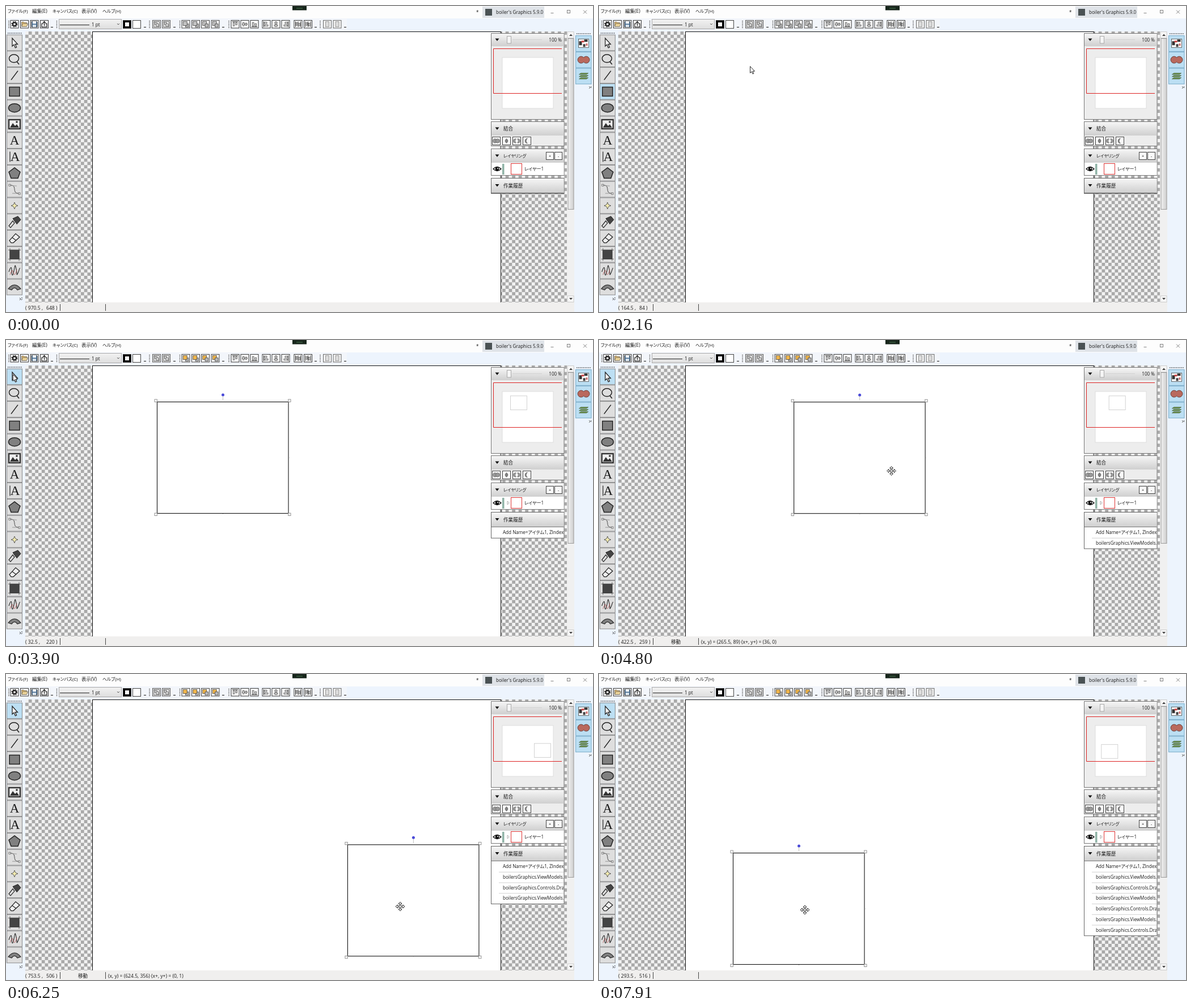
These frames come from a looping animation (1035 px wide and 541 px high, 8000 ms). An HTML page:

```html
<!DOCTYPE html>
<html lang="ja">
<head>
<meta charset="utf-8">
<title>Drawing and moving a rectangle</title>
<style>
html, body { margin: 0; width: 100%; height: 100%; overflow: hidden; background: #fff; }
svg { display: block; width: 100%; height: 100%; }
text { font-family: "Open Sans", "Noto Sans CJK JP", "Noto Sans CJK", sans-serif; fill: #1a1a1a; white-space: pre; }
.kana { font-feature-settings: "palt" 1; }
.serif { font-family: "Liberation Serif", serif; }
</style>
</head>
<body>
<svg id="stage" viewBox="0 0 1035 541" preserveAspectRatio="none"></svg>
<script>
const LOOP = 8000, STEP = 69.5, LAG = 70, ZOOM = 0.72;
const PAGE = { x: 152, y: 45 };
const INK = '#222', GRAY = '#808080';

// ---- drawing helpers ----
const rect = (x, y, w, h, fill = 'none', stroke = 'none', sw = 1) =>
  `<rect x="${x}" y="${y}" width="${w}" height="${h}" fill="${fill}" stroke="${stroke}" stroke-width="${sw}"/>`;
const path = (d, fill = 'none', stroke = 'none', sw = 1) =>
  `<path d="${d}" fill="${fill}" stroke="${stroke}" stroke-width="${sw}"/>`;
const oval = (x, y, rx, ry, fill = 'none', stroke = 'none', sw = 1) =>
  `<ellipse cx="${x}" cy="${y}" rx="${rx}" ry="${ry}" fill="${fill}" stroke="${stroke}" stroke-width="${sw}"/>`;
const text = (x, y, s, size = 8.1, cls = '', more = '') =>
  `<text x="${x}" y="${y}" font-size="${size}" class="${cls}" ${more}>${s}</text>`;
const at = (x, y, body) => `<g transform="translate(${x} ${y})">${body}</g>`;
const dots = (x1, y1, x2, y2) =>
  `<path d="M${x1} ${y1}L${x2} ${y2}" stroke="#444" stroke-width="1.4" stroke-dasharray="1.4 1.5"/>`;

// ---- left tool bar ----
const toolIcons = [
  path('M-4-8V6L-1 3.3 1.4 9 3.6 8 1.2 2.5H5.5Z', '#fff', INK, 1.3),
  oval(-1, -1, 8.5, 7, 'none', INK, 1.5) + path('M4 4.5L8 9.5', 'none', INK, 1.6),
  path('M-6 8L6-8', 'none', INK, 1.5),
  rect(-9, -8, 18, 16, GRAY, INK, 1.5),
  oval(0, 0, 10.5, 7.5, GRAY, INK, 1.5),
  rect(-10, -8, 20, 16, '#eee', '#333', 2.4) + path('M-8 6L-3-2 1 3 4 0 8 6Z', '#333') + oval(4, -4, 1.8, 1.8, '#333'),
  text(0, 7.5, 'A', 23, 'serif', 'text-anchor="middle"'),
  text(1, 7.5, 'A', 23, 'serif', 'text-anchor="middle"') + path('M-8-9V9', 'none', INK, 1.2),
  path('M0-9.5L10-2 6 9H-6L-10-2Z', GRAY, INK, 1.5),
  path('M-8-7C6-9-6 8 8 7', 'none', '#444') + path('M-8-7L4-6M-4 7L8 7', 'none', '#888', .8) +
    rect(-10, -9, 3, 3, '#fff', '#555', .8) + rect(7, 6, 3, 3, '#fff', '#555', .8),
  path('M0-6L1.7-1.7 6 0 1.7 1.7 0 6-1.7 1.7-6 0-1.7-1.7Z', '#f6eeb0', '#555', .9),
  path('M-3-6L6-10 11-4 4 4Z', '#444', INK, 1) + path('M-4-5L3 4', 'none', '#eee', 1) +
    path('M-3-2L0 2-7 10-10 7Z', '#ddd', INK, 1.2),
  path('M-9 4L2-8 9-2-2 8H-6Z', '#eee', INK, 1.3) + path('M-4-1L3 4', 'none', INK, 1.2),
  rect(-8, -8, 16, 16, '#444', '#111', 1) + path('M-11-8H11M-11 8H11M-8-11V11M8-11V11', 'none', '#555', .9),
  path('M-10 2C-7-8-5-8-5 0S-3 12-1 0 1-12 3-3 3 10 6 4 8-5 10-5', 'none', '#222', 1.1) +
    path('M-8 7C-5 0-4-4-2 3S2 6 4-2', 'none', '#a44', .8),
  path('M-11 3Q0-11 11 3L5 5Q0-2-5 5Z', GRAY, INK, 1.1)
];
const TOOL_PITCH = 28.8;
const toolBar = rect(0, 45, 34, 496, '#edf4fd') + dots(3, 48, 28, 48) +
  toolIcons.map((icon, i) => {
    const y = 51 + TOOL_PITCH * i;
    return `<rect class="tool" x="1.5" y="${y}" width="27" height="27.8" stroke="#8a8a8a"/>` + at(15, y + 14, icon);
  }).join('') +
  path('M24 516l2 2-2 2M27 516h2M27 520l1.5-2', 'none', INK, .9);

// ---- top bars ----
const box = (cx, body, fill = '#fff', stroke = '#333') =>
  at(cx, 32.2, rect(-7, -6.8, 14, 13.6, fill, stroke, 1) + body);
const overflow = x => path(`M${x - 2} 37.5h4`, 'none', '#333', 1.2);
const align = (cx, turn, edge) => box(cx, `<g transform="rotate(${turn})">` +
  path(`M-5 ${edge * .9}H5`, 'none', INK, 1) +
  rect(-3.6, -3, 2.6, 6, '#eee', '#444', .8) + rect(1, edge < 0 ? -3 : edge > 0 ? -1 : -2, 2.6, 4, '#eee', '#444', .8) + '</g>');
const grouping = cx => box(cx, rect(-4.8, -4.8, 9.6, 9.6, 'none', '#555', .9) +
  path('M-4.5-4.5L4.5 4.5', 'none', '#777', .8) +
  rect(-3, -3, 4, 4, '#ddd', '#555', .8) + rect(-.5, -.5, 4, 4, '#eee', '#555', .8), '#f4f4f4', '#555');
const arrange = (cx, i) => box(cx, i < 2
  ? rect(-.5, -.5, 5.5, 5.5, '#bbb', '#444', .8) + rect(-4.8, -4.8, 7, 7, 'currentColor', '#444', .8)
  : rect(-4.8, -4.8, 7, 7, 'currentColor', '#444', .8) + rect(-.5, -.5, 5.5, 5.5, '#bbb', '#444', .8), '#f8f8f8', '#444');
const spread = cx => box(cx, path('M-4.5-5V5M0-5V5M4.5-5V5', 'none', INK, .9) +
  rect(-3.5, -3, 2.4, 5, '#ccc', '#444', .6) + rect(1, -2, 2.6, 5, '#ccc', '#444', .6));

const topBars = rect(0, 0, 1035, 22, '#fdfdfd') + rect(0, 22, 1035, 23, '#edf4fd') +
  rect(3, 22.5, 598, 19.5, '#f3f6fb') +
  text(3, 12, 'ファイル(F)', 7.8, 'kana') + text(46, 12, '編集(E)', 8.5) + text(82, 12, 'キャンバス(C)', 7.8, 'kana') +
  text(133, 12, '表示(V)', 8.5) + text(170, 12, 'ヘルプ(H)', 7.8, 'kana') +
  rect(505, 0, 25, 7.5, '#17251b') + path('M512 4h11', 'none', '#4d7a55', 1) +
  text(829, 14, '*') + rect(840, 1, 109, 20, '#dfe3e8') + rect(845, 5, 12, 12, '#4a5254') +
  text(864, 14, "boiler's Graphics 5.9.0") +
  path('M960.5 12.5h5M1018 7.5l6 6M1024 7.5l-6 6', 'none', '#777', .9) + rect(989.5, 7.5, 5, 5, 'none', '#777', .9) +
  [5, 89.5, 253, 306.5, 393, 554].map(x => dots(x, 26, x, 40)).join('') +
  [81, 245, 297, 383, 546, 598].map(overflow).join('') +
  box(15, oval(0, 0, 3, 3, 'none', INK, 2.2) + `<circle r="4.8" fill="none" stroke="${INK}" stroke-width="1.6" stroke-dasharray="1.9 1.87"/>`) +
  box(32.5, path('M-5 4V-4H-1L0-3H4V4Z', '#d9b36a', '#555', .7) + path('M-5 4L-3-1H6L4 4Z', '#f0d79a', '#555', .7)) +
  box(50, path('M-5-5H4L5-4V5H-5Z', '#55799c', INK, .8) + rect(-3, -5, 6, 4, '#fff') + rect(-3, 1, 6, 4, '#dde6ee')) +
  box(67.5, path('M-2-1H-4.5V5H4.5V-1H2M0 3V-4.5M-2.5-2L0-5 2.5-2', 'none', INK, 1.3)) +
  rect(93.5, 23.5, 110, 17, 'url(#combo)', '#aaa') + path('M95 33.5H147', 'none', INK, 1) + text(151, 36, '1 pt') +
  path('M196 31l2 2 2-2', 'none', '#444', .9) +
  rect(206.5, 25.5, 14, 14, '#000', '#333') + rect(210, 29, 7, 7, '#fff') + rect(223.5, 25.5, 14, 14, '#fff', '#444') +
  [265.5, 282.5].map(grouping).join('') +
  `<g id="arrange">${[317, 334.5, 351.5, 369].map(arrange).join('')}</g>` +
  align(404, 0, -5) + align(421, 0, 0) + align(438, 0, 5) + align(459, -90, -5) + align(476, -90, 0) + align(493, -90, 5) +
  spread(515) + spread(532.5) +
  [566.5, 584].map(x => box(x, rect(-3, -4.5, 6, 9, '#ddd', '#888', .8), '#f4f4f4', '#666')).join('');

// ---- right side ----
const panel = (y, h) => rect(855.5, y + .5, 128.5, h - 1, '#ededed', '#777');
const header = (y, h, label, cls, size) => rect(856, y + 1, 127.5, h, 'url(#head)') +
  path(`M862.5 ${y + h / 2 - 1.5}h7l-3.5 4.5z`, '#111') + (label ? text(877, y + h / 2 + 4, label, size, cls) : '');
const button = (x, y, s, body) => rect(x + .5, y + .5, s, s, '#fafafa', '#444') + at(x + s / 2 + .5, y + s / 2 + .5, body);
const two = oval(-2.3, 0, 3.5, 3.8, '#999', '#666', .7) + oval(2.3, 0, 3.5, 3.8, '#999', '#666', .7);

const panels = panel(48, 153) + header(48, 22) + path('M893 59.5H945', 'none', '#d2d2d2', 1) +
  rect(883.5, 53.5, 7, 12.5, '#f4f4f4', '#aaa') + text(980, 62.5, '100 %', 8.1, '', 'text-anchor="end"') +
  rect(875, 91, 90, 90, '#fff', '#ddd') +
  path('M980 75.5H859.5V154.5H980', 'none', '#d22', 1) +
  panel(204, 44) + header(204, 24, '結合', '', 8.6) +
  button(857, 231, 14, two) + button(875, 231, 14, path('M0-4Q5 0 0 4Q-5 0 0-4', GRAY, '#666', .6)) +
  button(893, 231, 14, two + path('M0-4Q4 0 0 4Q-4 0 0-4', '#fff')) +
  button(911, 231, 14, path('M1-4.5A4.5 4.5 0 1 0 1 4.5Q-3.5 0 1-4.5', GRAY, '#666', .6)) +
  panel(252, 48) + header(252, 24, 'レイヤリング', 'kana', 7.6) +
  button(952, 258, 13, text(0, 3, '+', 8, '', 'text-anchor="middle"')) +
  button(967, 258, 13, text(0, 3, '-', 8, '', 'text-anchor="middle"')) +
  rect(856, 277, 127.5, 22, '#fff') +
  path('M859 288Q866 281 873 288Q866 295 859 288Z', '#fff', '#111', 1.3) + oval(866, 288, 3.4, 3.4, '#111') + oval(867, 287, 1, 1, '#fff') +
  rect(875, 279, 3.5, 19, '#8fb3a6') + rect(890.5, 278.5, 19, 19, '#fff', '#d33') + text(914, 291, 'レイヤー1', 8.1, 'kana');

const sideButton = (y, body) => rect(1004.5, y + .5, 27.5, 27.8, '#bcdff3', '#76a9c6') + at(1018.5, y + 14.3, body);
const rightSide = rect(989, 45, 13, 479, '#f0f0f0') + rect(990, 45.5, 11, 11, '#f7f7f7', '#ccc') +
  rect(991, 57.5, 10, 302, 'url(#thumb)', '#999') + rect(990, 512.5, 11, 11, '#f7f7f7', '#ccc') +
  path('M993 53l3-3.5 3 3.5zM993 516l3 3.5 3-3.5z', '#444') +
  rect(1002, 45, 33, 496, '#edf4fd') + dots(1006, 49, 1031, 49) +
  sideButton(52, rect(-9, -8, 18, 15, '#fff', '#444', .8) + rect(-8, -4, 5, 7, '#333') + rect(1, -7, 6, 4, '#333') +
    rect(-1, 1, 4, 5, '#444') + rect(-4, -5, 5, 3, '#c44') + rect(4, 0, 3, 4, '#c66')) +
  sideButton(80.8, path('M0-4A6 6 0 1 0 0 4A6 6 0 1 0 0-4Z', '#b9695d', '#6b3d38', 1)) +
  sideButton(109.6, [4, 0, -4].map(y => path(`M-8 ${y + 1.1}L-5 ${y - 1.1}H8L5 ${y + 1.1}Z`, '#6f9a4f', '#475e35', .8)).join('')) +
  path('M1028 142l2 2-2 2M1031.5 142v3', 'none', '#444', .9);

const statusBar = rect(34, 524, 968, 17, '#f0efee') + path('M95.5 527V539M175.5 527V539', 'none', '#444', 1);

document.getElementById('stage').innerHTML = `<defs>
  <pattern id="check" x="34" y="45" width="11.52" height="11.52" patternUnits="userSpaceOnUse">
    <rect width="11.52" height="11.52" fill="#a9a9a9"/><path d="M0 0h5.76v11.52h5.76v-5.76H0z" fill="#f2f2f2"/></pattern>
  <linearGradient id="head" x2="0" y2="1"><stop stop-color="#f6f6f6"/><stop offset="1" stop-color="#cfcfcf"/></linearGradient>
  <linearGradient id="combo" x2="0" y2="1"><stop stop-color="#f2f2f2"/><stop offset="1" stop-color="#dedede"/></linearGradient>
  <linearGradient id="thumb"><stop stop-color="#f0f0f0"/><stop offset="1" stop-color="#cfcfcf"/></linearGradient>
  <clipPath id="list"><rect x="856" y="300" width="127" height="230"/></clipPath></defs>` +
  rect(0, 0, 1035, 541, '#fff') + rect(34, 45, 955, 479, 'url(#check)') + rect(152.5, 45.5, 720, 490, '#fff', '#111') +
  '<g id="shape"></g>' + topBars + toolBar + rightSide + statusBar + panels + '<g id="live"></g>';

// ---- motion ----
// Pointer path: time, x, y
const keys = [
  [220, 580, 530], [430, 9, 255], [830, 9, 255], [1150, 15, 150], [1400, 15, 150], [1600, 25, 146],
  [2090, 270.6, 105.5], [2160, 266, 107], [2210, 266, 109], [2440, 470, 285], [2780, 505.7, 317.7],
  [2850, 502, 312], [2960, 498, 306], [3120, 498, 306], [3260, 486, 300], [3520, 175.7, 203.5], [3700, 12, 61],
  [4000, 12, 61], [4100, 40, 75], [4420, 379, 231], [4550, 379, 231], [5100, 713, 232], [5350, 713, 232],
  [5420, 707, 230], [5570, 692.6, 218], [5700, 692.6, 218], [6130, 694.4, 408.3], [6180, 694.5, 409.3],
  [6250, 695, 411], [6320, 695, 412], [6520, 695, 412], [6640, 721, 405], [6760, 721, 405],
  [7230, 354.6, 417], [7700, 354.6, 417], [7840, 363.3, 416.5], [7910, 363, 417]
];
const drags = [[4500, 5280], [5650, 6560], [6720, 7440]];
const DRAW = [2200, 3130], PICK_RECT = 1200, PICK_ARROW = 3760;

const slope = (i, a) => (keys[i + 1][a] - keys[i][a]) / (keys[i + 1][0] - keys[i][0]);
function tangent(i, a) {
  if (i < 1 || i > keys.length - 2) return 0;
  const p = slope(i - 1, a), q = slope(i, a);
  return p * q > 0 ? 2 * p * q / (p + q) : 0;
}
// Monotone cubic through the keys
function pointer(t) {
  const last = keys.length - 1;
  t = Math.min(Math.max(t, keys[0][0]), keys[last][0]);
  let i = 0;
  while (i < last - 1 && keys[i + 1][0] < t) i++;
  const h = keys[i + 1][0] - keys[i][0], u = (t - keys[i][0]) / h, v = 1 - u;
  const [x, y] = [1, 2].map(a => keys[i][a] * (1 + 2 * u) * v * v + keys[i + 1][a] * (3 - 2 * u) * u * u +
    h * u * v * (v * tangent(i, a) - u * tangent(i + 1, a)));
  return { x, y };
}
const docX = x => Math.floor((x - PAGE.x) / ZOOM) + .5;
const docY = y => Math.round((y - PAGE.y) / ZOOM);
const during = (t, [a, b]) => t >= a && t < b;

// The app follows the pointer one step late
const seen = t => pointer(t - LAG);
function corner(t) {
  const p = { x: 266, y: 109 };
  for (const [a, b] of drags) if (t > a) {
    const from = seen(a), to = seen(Math.min(t, b));
    p.x += to.x - from.x;
    p.y += to.y - from.y;
  }
  return p;
}

function drawShape(t) {
  if (t < DRAW[0]) return '';
  if (t < DRAW[1]) {
    const p = seen(t);
    return rect(266.5, 109.5, Math.max(0, p.x - 266.5), Math.max(0, p.y - 109.5), 'none', '#888');
  }
  const { x, y } = corner(t), w = 231.5, h = 197;
  const grip = (gx, gy) => rect(gx - 2.2, gy - 2.2, 4.4, 4.4, '#fff', '#888', .9);
  return at(x, y, rect(.5, .5, w, h, '#fff', '#111', 1.1) +
    path('M116.5-10V-2', 'none', '#bbb', .9) + oval(116.5, -12, 2.5, 2.5, '#4a4ad8') +
    grip(-1.8, -1.8) + grip(w + 2.3, -1.8) + grip(-1.8, h + 2.3) + grip(w + 2.3, h + 2.3) +
    rect(w + 1, 98.5, 1, 1, '#999') + rect(116, h + 1, 1, 1, '#999'));
}

function statusText(t) {
  let s = t - LAG;
  if (s > 370 && s < 1860) s = 370;
  if (s > 3520 && s < 4240) s = 3520;
  const p = pointer(s);
  const [px, py] = s < 220 ? [970.5, 648] : [docX(p.x), docY(p.y)];
  let out = text(34, 537, `( ${px} ,`, 8.6) + text(71, 537, `${py} )`, 8.6);
  const note = (mode, info) => text(127, 537, mode, 8.6) + text(180, 537, info, 8.6);
  if (during(t, DRAW))
    out += note('描画', `(158.5, 89) - (${px}, ${py}) (w, h) = (${px - 158.5}, ${py - 89})`);
  else if (drags.some(d => during(t, d))) {
    const a = corner(t - 35), b = corner(t), x = docX(b.x), y = docY(b.y);
    out += note('移動', `(x, y) = (${x}, ${y}) (x+, y+) = (${x - docX(a.x)}, ${y - docY(a.y)})`);
  }
  return out;
}

function drawHistory(t) {
  const rows = t < DRAW[1] ? [] : ['Add Name=アイテム1, ZIndex=0'];
  for (const [a, b] of drags) {
    if (t >= a) rows.push('boilersGraphics.ViewModels.Item');
    if (t >= b) rows.push('boilersGraphics.Controls.DragThumb');
  }
  const rowH = 18.75, bottom = 331.5 + rowH * rows.length;
  return rect(855.5, 304.5, 128.5, bottom - 304.5, '#fff', '#666') + header(304, 25, '作業履歴', '', 8.6) +
    path('M856 330.5H983.5', 'none', '#777', 1) + '<g clip-path="url(#list)">' +
    rows.map((s, i) => text(876, 343.2 + rowH * i, s, 8.1, 'kana') +
      (i ? path(`M869 ${331.5 + rowH * i}H983`, 'none', '#ccc', .9) : '')).join('') + '</g>';
}

function drawPointer(t) {
  if (t < 220) return '';
  const p = pointer(t), c = corner(t);
  const inside = p.x > c.x && p.x < c.x + 232 && p.y > c.y && p.y < c.y + 197;
  if (t > PICK_ARROW && inside)
    return at(p.x, p.y, path('M0-8l3 3.2h-2v3.8h3.8v-2L8 0 4.8 3v-2H1v3.8h2L0 8l-3-3.2h2V1h-3.8v2L-8 0l3.2-3v2H-1v-3.8h-2Z', '#fff', '#111', .9));
  return (during(t, DRAW) ? oval(p.x - .5, p.y - .5, 8.5, 8.5, '#f8f173') : '') +
    at(p.x + .3, p.y, path('M0 0V11.7L2.7 9.2 4.5 13.4 6.3 12.6 4.5 8.5H8Z', '#fff', '#111', .9));
}

function drawMini(t) {
  if (t < DRAW[1]) return '';
  const { x, y } = corner(t);
  return rect(875.3 + (x - PAGE.x) / 8, 90.8 + (y - PAGE.y) / 8, 29, 24.6, 'none', '#ccc', .9) +
    path('M884 285l3.5 3-3.5 3z', '#fff', '#999', .8);
}

const tools = document.querySelectorAll('.tool');
const arrangeIcons = document.getElementById('arrange');
const shape = document.getElementById('shape'), live = document.getElementById('live');

function render(t) {
  const active = t < PICK_RECT ? -1 : t < PICK_ARROW ? 3 : 0;
  tools.forEach((el, i) => el.setAttribute('fill', i === active ? '#bcdff3' : '#dedede'));
  arrangeIcons.style.color = t < DRAW[1] ? '#c4c4c4' : '#f0b64c';
  shape.innerHTML = drawShape(t);
  live.innerHTML = drawMini(t) + drawHistory(t) + statusText(t) + drawPointer(t);
}

const start = performance.now();
let shown = null;
function frame() {
  const t = (performance.now() - start) % LOOP;
  const tick = Math.floor((t - 820) / STEP);
  if (tick !== shown) {
    shown = tick;
    render(Math.max(0, 830 + tick * STEP));
  }
  requestAnimationFrame(frame);
}
frame();
</script>
</body>
</html>
```
